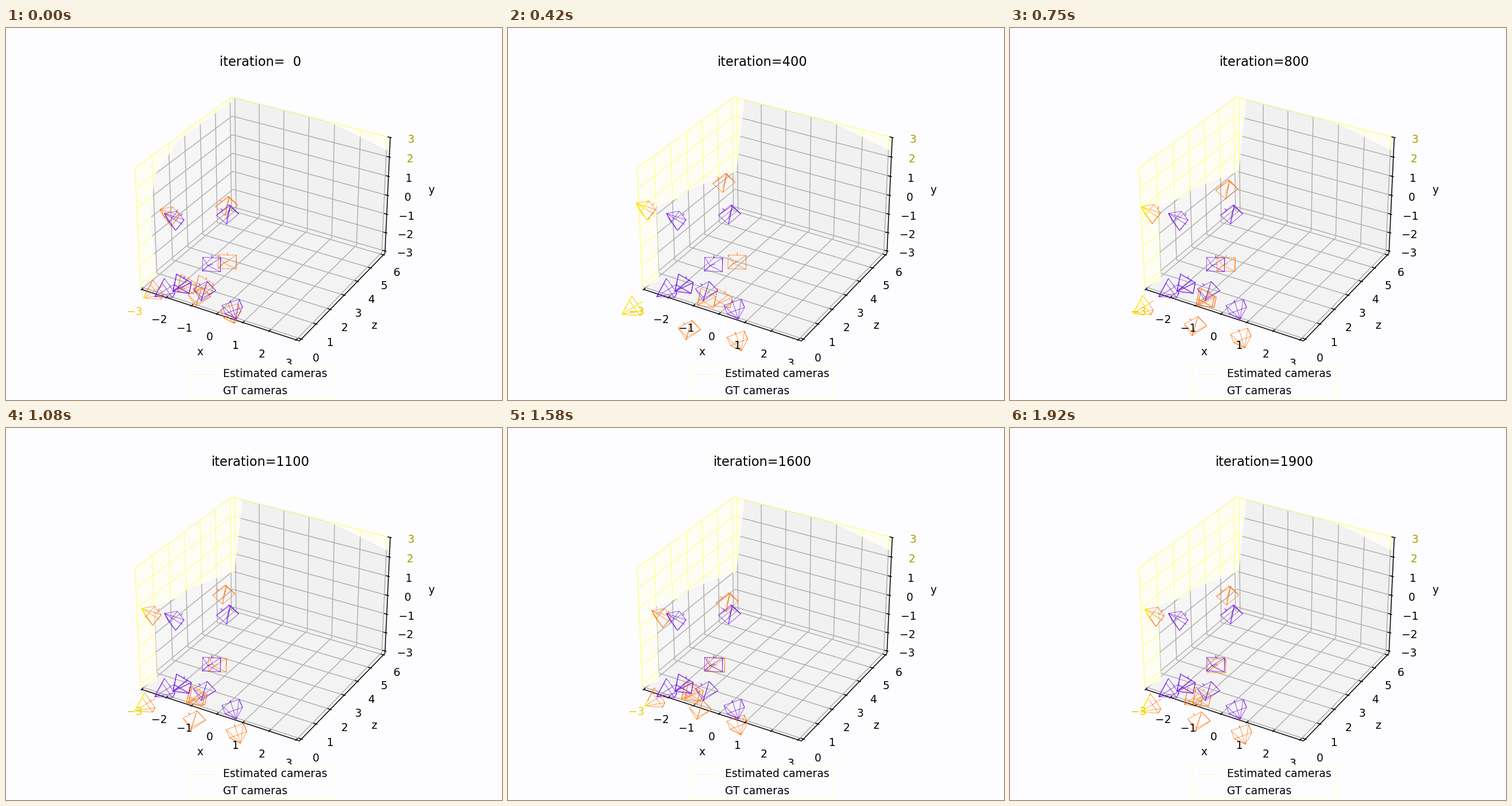
Write a matplotlib script that moves like this. It is 864x648 px and loops after 2.01 s.

```python
import numpy as np
import matplotlib.pyplot as plt
from matplotlib.animation import FuncAnimation
from matplotlib.collections import LineCollection
from matplotlib.patches import Polygon, Rectangle

W, H, DPI = 864, 648, 135
LO, HI, TOP = -3.125, 3.125, 3
PAPER, PALE, SOFT = "#fdfdff", "#fdfdf4", "#ffff9c"
ORANGE, PURPLE, YELLOW = "#ff7d1e", "#7a22e4", "#fff000"
OLIVE, GOLD = "#a89c00", "#e6cc00"

plt.rcParams["font.family"] = "DejaVu Sans"
fig = plt.figure(figsize=(W / DPI, H / DPI), dpi=DPI, facecolor=PAPER)
ax = fig.add_axes([0, 0, 1, 1])
ax.set_xlim(0, W)
ax.set_ylim(H, 0)
ax.axis("off")


def project(x, y, z):
    """Perspective view of the box (elevation 30, azimuth -60), in pixels."""
    x, y, z = x * 0.19048, y * 0.19048, z * 0.14286
    right = 0.866 * x + 0.5 * y
    up = -0.25 * x + 0.433 * y + 0.866 * z
    depth = 10 - (0.433 * x - 0.75 * y + 0.5 * z)
    return (193.3 + (right / depth + 0.095) * 2697,
            576.7 - (up / depth + 0.095) * 2697)


def path(*points):
    return [project(*p) for p in points]


def lines(segments, color, width, z):
    coll = LineCollection(segments, colors=color, linewidths=width, zorder=z)
    ax.add_collection(coll)
    return coll


def label(x, y, s, color="black", size=10, z=6.5, **kw):
    kw = {"ha": "center", "va": "center", **kw}
    return ax.text(x, y, s, color=color, fontsize=size, zorder=z, **kw)


# Panes and grid
left = path((LO, -TOP, LO), (LO, HI, LO), (LO, HI, TOP), (LO, -TOP, TOP))
back = path((LO, HI, LO), (HI, HI, LO), (HI, HI, TOP), (LO, HI, TOP))
floor = path((LO, LO, LO), (HI, LO, LO), (HI, HI, LO), (LO, HI, LO))
for pane, shade in ((left, "#f6f6f7"), (back, "#f1f1f2"), (floor, "#f3f3f4")):
    ax.add_patch(Polygon(pane, fc=shade, ec="none", zorder=1))

ticks = range(-3, 4)
wall, grid = [], []
for t in ticks:
    wall.append(path((LO, t, LO), (LO, t, TOP)))
    wall.append(path((LO, -TOP, t), (LO, HI, t)))
    grid.append(path((t, HI, LO), (t, HI, TOP)))
    grid.append(path((LO, HI, t), (HI, HI, t)))
    grid.append(path((t, LO, LO), (t, HI, LO)))
    grid.append(path((LO, t, LO), (HI, t, LO)))
lines(wall + grid, "#b0b0b0", 0.8, 2)


def tint(points):
    """Pale yellow region in which the grid turns yellow as well."""
    patch = ax.add_patch(Polygon(points, fc=PALE, ec="none", zorder=2.2))
    coll = lines(wall + grid, SOFT, 0.8, 2.4)
    coll.set_clip_path(patch)
    return patch, coll


rim = [(233, 453), (223, 242), (395, 119)]
tint([(545, 157), (669, 190), (664, 213), (620, 191), (572, 168)])
early = tint(rim + [(393, 128), (300, 196), (258, 258), (252, 340), (262, 430)])
late = tint(rim + [(412, 125), (398, 250), (318, 280), (298, 296), (258, 310),
                   (263, 440)])
lines([[left[0], left[3], left[2], back[2]]], SOFT, 0.8, 2.5)

# Axis lines, ticks and numbers
OUT, IN = 0.052, 0.104
axes = [path((-TOP, LO, LO), (HI, LO, LO)),
        path((HI, LO, LO), (HI, HI, LO)),
        path((HI, HI, LO), (HI, HI, TOP))]
for t in ticks:
    axes.append(path((t, LO - OUT, LO), (t, LO + IN, LO)))
    axes.append(path((HI + OUT, t, LO), (HI - IN, t, LO)))
    axes.append(path((HI + OUT, HI, t), (HI - IN, HI, t)))
    text = str(t).replace("-", "\u2212")
    label(*project(t, LO - 0.47, LO - 0.86), text,
          GOLD if t == -3 else "black")
    label(*project(HI + 0.546, t, LO - 0.76), str(t + 3))
    label(*project(HI + 0.667, HI + 0.207, t), text,
          OLIVE if t >= 2 else "black")
lines(axes, "black", 0.8, 3)
label(338, 564, "x")
label(641, 518, "z")
label(741, 283, "y")
title = label(443, 66.5, "", size=12, va="baseline")

# Legend
ax.add_patch(Rectangle((319, 587), 249, 59, fc=PAPER, ec="#ffffd8",
                       lw=0.8, zorder=7))
lines([[(326, 602.5), (363, 602.5)]], "#fff0b0", 0.5, 8)
for y, s in ((602, "Estimated cameras"), (631, "GT cameras")):
    label(378, y + 6.5, s, z=8, ha="left", va="baseline")


def frustum(apex, roll):
    """Wire of a rigid pyramid seen flat, around the centre of its base."""
    apex = np.array(apex, float)
    size = np.hypot(*apex)
    axis = -apex / size
    side = np.array([-axis[1], axis[0]])
    axis = -axis * np.sqrt(1 - (size / 30) ** 2)
    cos, sin = np.cos(np.radians(roll)), np.sin(np.radians(roll))
    r = 16 * (cos * axis + sin * side)
    u = 12 * (cos * side - sin * axis)
    a, b, c, d = u - r, u + r, -u - r, r - u
    tip = -0.5 * apex
    return np.array([a, u, u * 4 / 3, u, b, d, c, a,
                     apex, b, d, apex, c, apex, tip])


# Each camera: true place, apex, roll, spread of the error, sideways drift
CAMERAS = [
    ((297, 336), (-21, -13), 168, (-61, -10), 8),
    ((386, 325), (5, -16), -28, (-10, -48), 0),
    ((358, 412), (-6, 2), 160, (0, 4), 50),
    ((308, 445), (-17, 13), 121, (40, 34), 0),
    ((308, 446), (-17, 13), 121, (15, 34), 65),
    ((346, 456), (-6, 19), 144, (-24, 78), -8),
    ((394, 485), (7, 22), 93, (14, 65), -10),
    ((283, 453), (-24, 15), 101, (-45, 40), -20),
]


def true_wire(place, apex, roll, *_):
    return frustum(apex, roll) + place


def guess_wire(step, camera):
    *_, spread, drift = camera
    swell = np.interp(step, [0, 3, 6, 16, 19], [0.2, 1, 0.93, 0.43, 0.68])
    fade = np.exp(-abs(step - 3) / 5)
    return (true_wire(*camera) + swell * np.array(spread)
            + fade * np.array([drift, -10]))


lines([true_wire(*cam) for cam in CAMERAS], PURPLE, 0.4, 6)
guess = lines([], ORANGE, 0.4, 5)
guess_edge = lines([], YELLOW, 0.45, 5.5)
guess_edge.set_clip_path(ax.add_patch(
    Rectangle((0, 0), 243, H, fc="none", ec="none")))


def step_at(ms):
    """Twelve slots a second; one slot in six repeats the step before it."""
    slot = min(int((ms + 5) * 12 / 1000), 23)
    return slot - (slot + 2) // 6


def update(i):
    step = step_at(i * 10)
    title.set_text(f"iteration={step * 100:3d}")
    wires = [guess_wire(step, cam) for cam in CAMERAS]
    guess.set_segments(wires)
    guess_edge.set_segments(wires)
    for artist in early:
        artist.set_visible(step == 0)
    for artist in late:
        artist.set_visible(step > 0)
    return [title, guess, guess_edge, *early, *late]


anim = FuncAnimation(fig, update, frames=201, interval=10, repeat=True,
                     repeat_delay=0, init_func=lambda: update(0))
plt.show()
```
